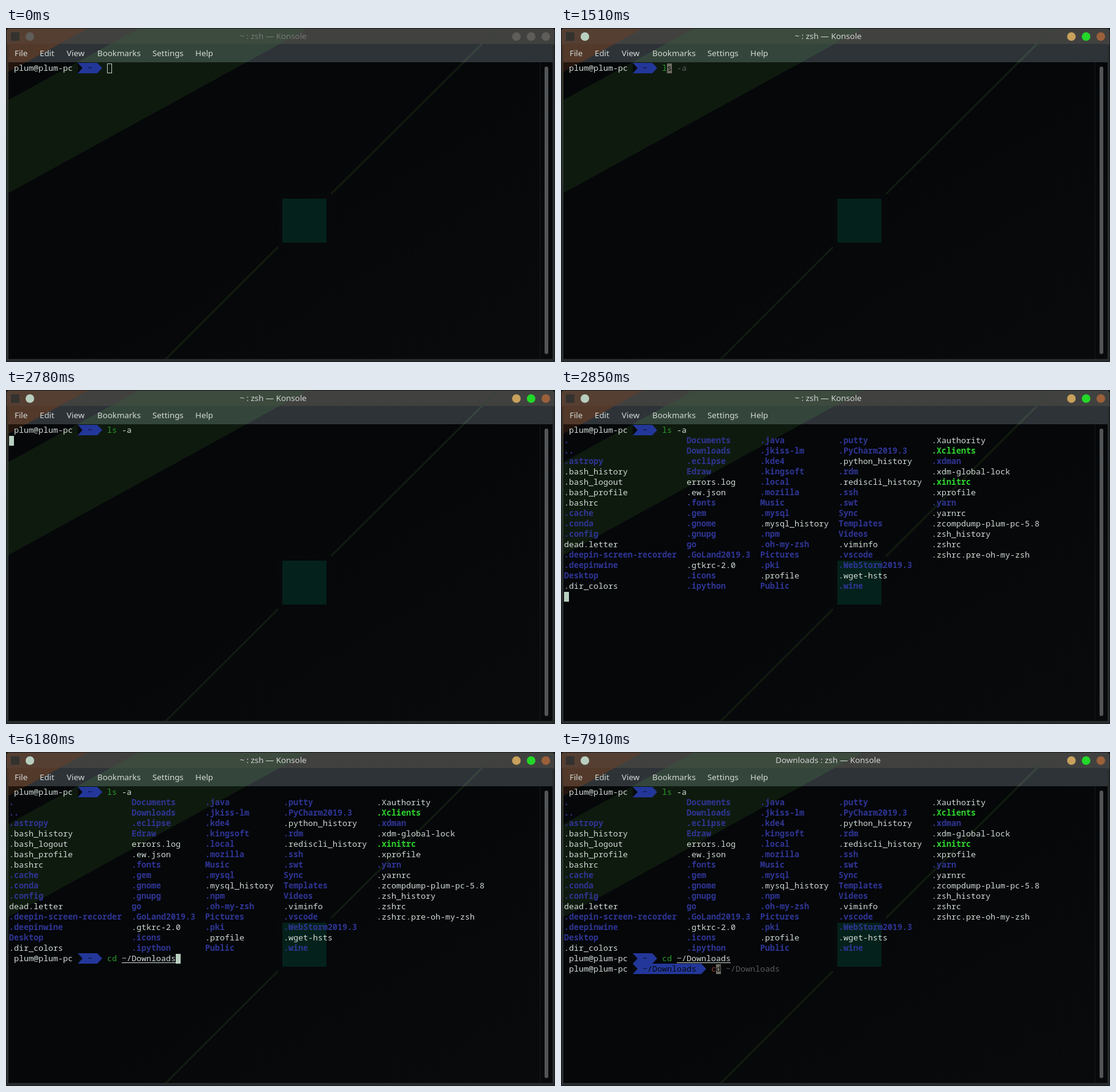
Recreate the animation shown at these times as an HTML page. Size 896 px wide and 546 px high, loop 8000 ms.

```html
<!DOCTYPE html>
<html lang="en">
<head>
<meta charset="utf-8">
<title>Terminal</title>
<style>
html, body { margin: 0; width: 100%; height: 100%; overflow: hidden; background: #0b0c0d; }
svg { display: block; width: 100%; height: 100%; }
text { white-space: pre; }
.mono { font: 13.333px "Noto Sans Mono", monospace; }
.ui { font: 13.333px "Noto Sans", sans-serif; }
.bold { font-weight: 700; }
</style>
</head>
<body>
<svg id="stage" viewBox="0 0 896 546" xmlns="http://www.w3.org/2000/svg">
  <defs>
    <clipPath id="win"><path d="M0 546V6Q0 0 6 0H890Q896 0 896 6V546Z"/></clipPath>
    <clipPath id="titleClip"><rect width="896" height="27"/></clipPath>
    <clipPath id="menuClip"><rect x="4" y="26" width="888" height="30"/></clipPath>
    <clipPath id="termClip"><rect x="4" y="56" width="888" height="485"/></clipPath>
    <linearGradient id="dark" x1="0" y1="0" x2="1" y2="1">
      <stop offset=".5" stop-color="#050709"/><stop offset=".75" stop-color="#08090b"/><stop offset="1" stop-color="#090a0c"/>
    </linearGradient>
    <linearGradient id="bar" x1="0" y1="0" x2="0" y2="1">
      <stop offset="0" stop-color="#414240"/><stop offset="1" stop-color="#303337"/>
    </linearGradient>
    <linearGradient id="edge" x1="0" y1="0" x2="0" y2="1">
      <stop offset="0" stop-color="#4a3528"/><stop offset=".12" stop-color="#33332d"/><stop offset=".3" stop-color="#29382c"/><stop offset=".55" stop-color="#2c2f32"/><stop offset="1" stop-color="#2c2f32"/>
    </linearGradient>
  </defs>
  <g clip-path="url(#win)">
    <rect width="896" height="546" fill="#292c2e"/>
    <rect y="27" width="4" height="519" fill="url(#edge)"/>
    <g id="paper"></g>
    <g id="chrome"></g>
    <g id="term" class="mono"></g>
    <path d="M.5 546V6Q.5 .5 6 .5H890Q895.5 .5 895.5 6V545.5H0" fill="none" stroke="#191b1c"/>
  </g>
</svg>
<script>
const LOOP = 8000, CELL = 8, ROW = 17, LEFT = 5, TOP = 58;
const FG = '#d0dad4', CURSOR = '#b8cfc0', GREY = '#585c5a', GHOST = '#706d62',
      BLUE = '#23379a', DIR = '#2f3594', GREEN = '#2c992c', EXEC = '#2fd52f', RED = '#a04238', INK = '#070a0b';
const $ = id => document.getElementById(id);

function add(parent, tag, attrs, text) {
  const el = document.createElementNS('http://www.w3.org/2000/svg', tag);
  for (const k in attrs) el.setAttribute(k, attrs[k]);
  if (text !== undefined) el.textContent = text;
  parent.appendChild(el);
  return el;
}

// Desktop wallpaper seen through one translucent part of the window
function wallpaper(clip, base, brown, green, line) {
  const g = add($('paper'), 'g', { 'clip-path': `url(#${clip})` });
  add(g, 'rect', { width: 896, height: 546, fill: base });
  add(g, 'path', { d: 'M0 74L135 0H0Z', fill: brown });
  add(g, 'path', { d: 'M0 120L218 0H494L0 272Z', fill: green });
  add(g, 'path', { d: 'M803 0L530 272M444 358L260 542', stroke: line, 'stroke-width': 3 });
  return g;
}
const term = wallpaper('termClip', 'url(#dark)', '#23150d', '#0f1a0f', '#111c10');
add(term, 'rect', { x: 444, y: 272, width: 89, height: 87, fill: '#060809' });
add(term, 'rect', { x: 451, y: 279, width: 72, height: 72, fill: '#04211b' });
wallpaper('titleClip', 'url(#bar)', '#553f32', '#3d4a3e', '#3b423b');
wallpaper('menuClip', '#2e3338', '#53392a', '#34463c', '#38463e');

const chrome = $('chrome');
add(chrome, 'rect', { x: 871, y: 56, width: 1, height: 485, fill: '#15181a' });
add(chrome, 'rect', { x: 879, y: 63, width: 6, height: 470, rx: 3, fill: '#525557' });
[['File', 14], ['Edit', 55], ['View', 99], ['Bookmarks', 149], ['Settings', 239], ['Help', 309]]
  .forEach(([s, x]) => add(chrome, 'text', { x, y: 46, class: 'ui', fill: '#d3d9d6' }, s));
add(chrome, 'rect', { x: 8, y: 7, width: 14, height: 14, fill: '#34322f' });
const title = add(chrome, 'text', { x: 436, y: 17.5, class: 'ui', 'text-anchor': 'middle' });
const buttons = [[39, [184, 207, 192]], [833, [200, 161, 92]], [857, [35, 216, 40]], [881, [155, 96, 58]]]
  .map(([cx, rgb]) => ({ rgb, el: add(chrome, 'circle', { cx, cy: 14, r: 7 }) }));

const mix = (a, b, k) => `rgb(${a.map((v, i) => Math.round(v + (b[i] - v) * k))})`;
const colX = c => LEFT + c * CELL, rowY = r => TOP + r * ROW;

function write(g, row, col, s, fill, cls = '') {
  add(g, 'text', { x: colX(col), y: rowY(row) + 12, fill, class: cls }, s);
}

function prompt(g, row, dir) {
  const x = colX(14), y = rowY(row) - 1, w = (dir.length + 3) * CELL;
  write(g, row, 1, 'plum@plum-pc', FG);
  add(g, 'path', { d: `M${x} ${y}h${w}l8 8.5l-8 8.5h${-w}Z`, fill: BLUE });
  add(g, 'path', { d: `M${x} ${y}l8 8.5l-8 8.5Z`, fill: INK });
  write(g, row, 16, dir, INK);
}

// Typed text, the grey suggestion after it, and the block cursor between them
function input(g, row, col, typed, color, rest) {
  const space = typed.indexOf(' ');
  const cmd = space < 0 ? typed : typed.slice(0, space);
  write(g, row, col, cmd, color);
  write(g, row, col + cmd.length, typed.slice(cmd.length), FG);
  const at = col + typed.length;
  if (rest === undefined) return;
  block(g, row, at, rest ? GHOST : CURSOR);
  if (rest) {
    write(g, row, at, rest[0], INK);
    write(g, row, at + 1, rest.slice(1), GREY);
  }
}

function block(g, row, col, fill = CURSOR) {
  add(g, 'rect', { x: colX(col), y: rowY(row), width: 8, height: 16, fill });
}

// "/" marks a directory, "*" an executable
const FILES = [
  [0, '/. /.. /.astropy .bash_history .bash_logout .bash_profile .bashrc /.cache /.conda /.config dead.letter /.deepin-screen-recorder /.deepinwine /Desktop .dir_colors'],
  [25, '/Documents /Downloads /.eclipse /Edraw errors.log .ew.json /.fonts /.gem /.gnome /.gnupg /go /.GoLand2019.3 .gtkrc-2.0 /.icons /.ipython'],
  [40, '/.java /.jkiss-lm /.kde4 /.kingsoft /.local /.mozilla /Music /.mysql .mysql_history /.npm /.oh-my-zsh /Pictures /.pki .profile /Public'],
  [56, '/.putty /.PyCharm2019.3 .python_history /.rdm .rediscli_history /.ssh /.swt /Sync /Templates /Videos .viminfo /.vscode /.WebStorm2019.3 .wget-hsts /.wine'],
  [75, '.Xauthority *.Xclients /.xdman .xdm-global-lock *.xinitrc .xprofile /.yarn .yarnrc .zcompdump-plum-pc-5.8 .zsh_history .zshrc .zshrc.pre-oh-my-zsh']
];
function listing(g) {
  for (const [col, names] of FILES) names.split(' ').forEach((n, i) => {
    if (n[0] === '/') write(g, i + 1, col, n.slice(1), DIR, 'bold');
    else if (n[0] === '*') write(g, i + 1, col, n.slice(1), EXEC, 'bold');
    else write(g, i + 1, col, n, FG);
  });
}

const LS = 'ls -a', CD = 'cd ~/Downloads';
const type = (row, col, s, n, color = GREEN) => g => input(g, row, col, s.slice(0, n), color, s.slice(n));
const first = n => type(0, 20, LS, n);
const second = (n, s = CD, color) => type(16, 20, s, n, color);

function pathLine(g) {
  add(g, 'rect', { x: colX(23), y: rowY(16) + 14, width: 88, height: 1, fill: FG });
}
function hollow(g) {
  add(g, 'rect', { x: 165.5, y: 58.5, width: 7, height: 15, fill: 'none', stroke: CURSOR });
}
function accepted(g) { second(CD.length)(g); pathLine(g); }
function entered(g) { input(g, 16, 20, CD, GREEN); pathLine(g); }

// Start time, number of finished stages, drawing of the active line
const STEPS = [
  [0, 0, hollow],
  [70, 0, g => block(g, 0, 20)],
  [1510, 0, first(1)],
  [1610, 0, first(2)],
  [1800, 0, first(3)],
  [2350, 0, first(4)],
  [2460, 0, first(5)],
  [2780, 1, g => block(g, 1, 0)],
  [2850, 2, g => block(g, 16, 0)],
  [2900, 3, g => block(g, 16, 20)],
  [3420, 3, second(1, 'clear', RED)],
  [3560, 3, second(2)],
  [3760, 3, second(3)],
  [6180, 3, accepted],
  [6590, 4, g => block(g, 17, 0)],
  [6660, 5, g => block(g, 17, 30)],
  [7910, 5, type(17, 30, CD, 1, RED)]
];

function drawTerm([, stage, active]) {
  const g = $('term');
  g.replaceChildren();
  prompt(g, 0, '~');
  if (stage >= 1) input(g, 0, 20, LS, GREEN);
  if (stage >= 2) listing(g);
  if (stage >= 3) prompt(g, 16, '~');
  if (stage >= 4) entered(g);
  if (stage >= 5) prompt(g, 17, '~/Downloads');
  active(g);
}

let shown;
function render(t) {
  const focus = t < 70 ? 0 : t < 110 ? .5 : 1;
  title.textContent = (t < 7120 ? '~' : 'Downloads') + ' : zsh — Konsole';
  title.setAttribute('fill', mix([116, 120, 115], [207, 213, 209], focus));
  for (const b of buttons) b.el.setAttribute('fill', mix([94, 93, 89], b.rgb, focus));
  const step = STEPS.findLast(s => s[0] <= t);
  if (step !== shown) drawTerm(shown = step);
}

const start = performance.now();
function tick() {
  render((performance.now() - start) % LOOP);
  requestAnimationFrame(tick);
}
tick();
</script>
</body>
</html>
```
